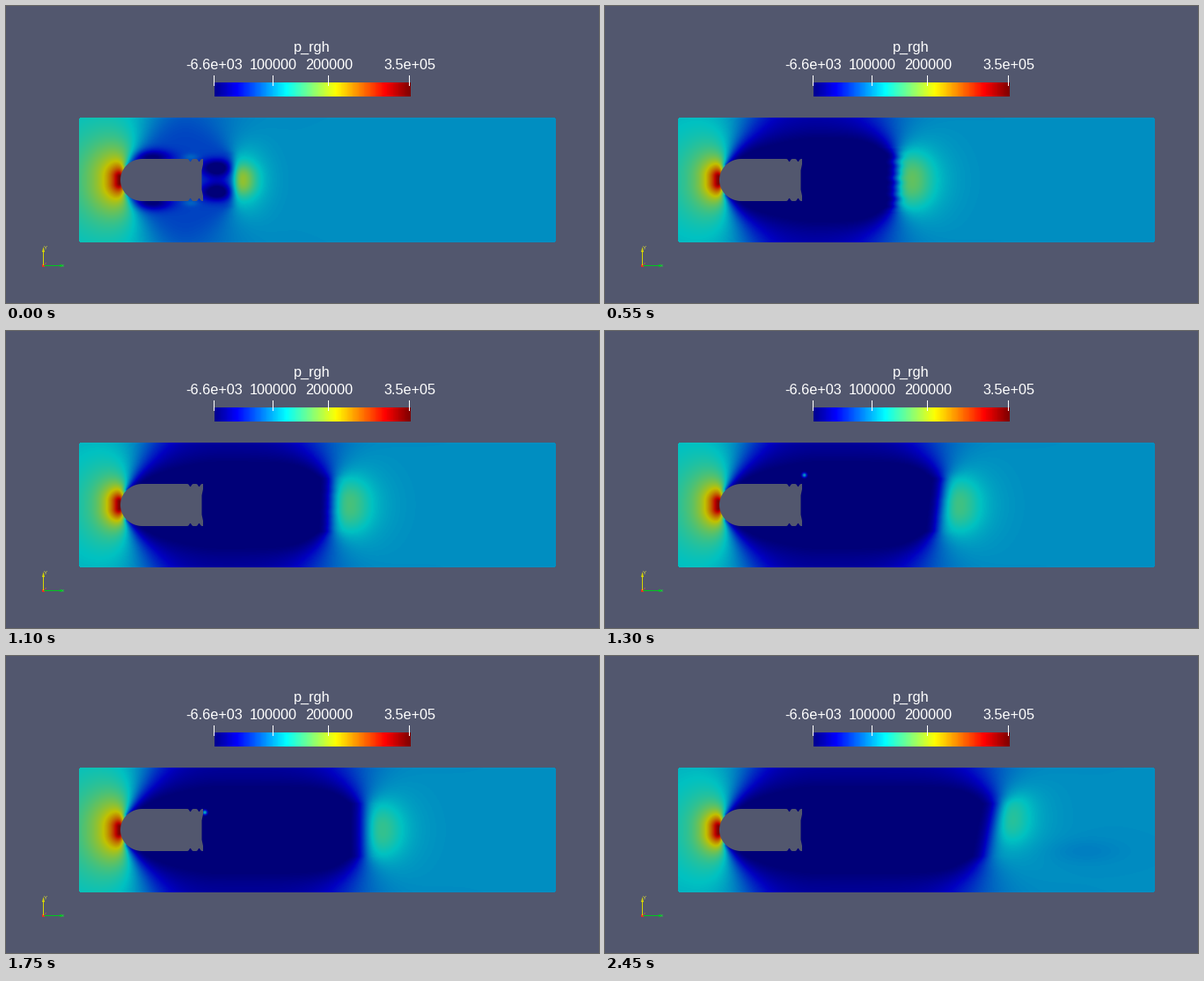
Animation, 674 px wide and 338 px high, one loop 2.5 s. Source, as a matplotlib script:

```python
import numpy as np
import matplotlib.pyplot as plt
from matplotlib.animation import FuncAnimation
from matplotlib.colors import LinearSegmentedColormap
from matplotlib.patches import Polygon

W, H, DPI = 674, 338, 64
FRAMES, STEP = 50, 50
PX = 72 / DPI
BG = (0.32, 0.34, 0.43)
LEFT, RIGHT, TOP, BOTTOM = 83, 625, 127, 269
MID = 198
AMBIENT = 0.297
FLOOR = 0.018
SHADE = 0.76

JET = LinearSegmentedColormap.from_list("flow", [
    (0, (0, 0, 0.5625)), (0.111, (0, 0, 1)), (0.365, (0, 1, 1)),
    (0.619, (1, 1, 0)), (0.873, (1, 0, 0)), (1, (0.5, 0, 0))], N=256)

X, Y = np.meshgrid(np.arange(LEFT, RIGHT) + 0.5, np.arange(TOP, BOTTOM) + 0.5)
DY = Y - MID
AY = np.abs(DY)


def sigmoid(v):
    return 1 / (1 + np.exp(-np.clip(v, -40, 40)))


def smooth(v):
    v = np.clip(v, 0, 1)
    return v * v * (3 - 2 * v)


def blob(x, y, rx, ry):
    return np.exp(-((X - x) / rx) ** 2 - ((Y - y) / ry) ** 2)


def mirrored(x, off, rx, ry):
    return blob(x, MID - off, rx, ry) + blob(x, MID + off, rx, ry)


# High pressure at the nose, fading downstream
R = np.hypot(X - 130, np.maximum(AY - 4, 0))
NOSE = 0.75 / (1 + (R / 13) ** 1.3) * (1 - smooth((X - 130) / 150))
NOSE_FAR = smooth(R / 40)

# Low pressure envelope around the body and the cavity
SIDE = np.maximum(AY - 18, 0)
ENTRY = sigmoid((X - 136 - 0.55 * SIDE) / (2.5 + 0.28 * SIDE))
OUTER = np.maximum(AY - 30, 0)
CORE = 24 + 12 * smooth((X - 150) / 90)
SPREAD = 1 - np.exp(-(np.maximum(AY - CORE, 0) / 22) ** 2)
START = (0.2 - 0.2 * mirrored(166, 25, 22, 9) - 0.24 * mirrored(240, 14, 19, 9.5)
         - 0.05 * blob(240, MID, 14, 12) + 0.05 * mirrored(210, 26, 9, 4))


def vortices(u):
    """Small eddies shed from the tail, alternating in height."""
    total = 0
    for k in range(4):
        age = u - (0.34 + 0.47 * k)
        total = total + 0.34 * np.exp(-(age / 0.07) ** 2) * blob(
            226 + 30 * age, 164 + 14 * (k % 2), 2.8, 2.8)
    jet = 0.45 * np.exp(-((u - 0.3) / 0.08) ** 2)
    return total + jet * blob(223, MID + 2, 6, 9)


def pressure(u):
    """Pressure at u seconds, scaled to 0..1."""
    front = 258 + 104.6 * u ** 0.612
    swing = 0.05 + 0.25 * np.cos(2 * np.pi * u / 1.75)
    tilt = 0.1 * u * max(0, np.sin(2 * np.pi * (u - 1.05) / 1.2))
    rough = 10 * u * np.exp(-u / 0.25)
    far = 0.06 + 0.14 * np.exp(-u / 0.25)
    late = smooth((u - 1.8) / 0.7)

    # Closure zone just behind the cavity
    amp = 0.12 + 0.15 * np.exp(-u / 0.9)
    bw = 11 + 6 * smooth(u / 0.4)
    bh = 14 + 9 * smooth(u / 0.3)
    dx = X - (front + 10 + 11 * smooth((u - 0.25) / 0.5))
    dy = DY + 14 * late
    core = np.exp(-(dx / (bw * np.where(dx > 0, 1.35, 1))) ** 2
                  - np.abs(dy / (bh * 1.25)) ** 2.4)
    halo = np.exp(-(dx / (bw * 2.7)) ** 2 - (dy / (bh + 22)) ** 2)
    base = AMBIENT + NOSE * (1 + swing * NOSE_FAR) + amp * (0.65 * core + 0.35 * halo)
    base -= 0.02 * late * blob(545, 222, 42, 14)

    ripple = np.sin(Y / 1.5 + 11 * u) + np.sin(Y / 2.7 - 8 * u)
    edge = front - tilt * np.clip(DY, -40, 40) - 0.4 * OUTER + rough * ripple * (AY < 38)
    wake = ENTRY * sigmoid((edge - X) / (3.2 + u + 0.38 * OUTER))
    grown = smooth(u / 0.26)
    low = (1 - grown) * START + grown * far * SPREAD
    p = base * (1 - wake) + low * wake + vortices(u)
    return np.clip(p, FLOOR, 1)


def render(u):
    rgba = JET(pressure(u))
    rgba[..., :3] *= SHADE
    rgba[::BOTTOM - TOP - 1, ::RIGHT - LEFT - 1, 3] = 0  # soften corners
    return rgba


def body_outline():
    a = np.linspace(0, np.pi / 2, 24)
    tail = np.linspace(204, 224, 41)
    notch = sum(3.2 * np.exp(-((tail - x) / 1.6) ** 2) for x in (209.5, 219.5))
    xs = np.concatenate([155 - 25 * np.cos(a), tail, [224, 222.5]])
    half = np.concatenate([24 * np.sin(a), 24 - notch, [18, 11]])
    upper = list(zip(xs, MID - half))
    return upper + [(x, 2 * MID - y) for x, y in reversed(upper)]


fig = plt.figure(figsize=(W / DPI, H / DPI), dpi=DPI, facecolor=BG)
ax = fig.add_axes([0, 0, 1, 1])
ax.axis("off")


def line(xs, ys, color):
    ax.plot(xs, ys, color=color, lw=PX, solid_capstyle="butt", snap=False)


def label(x, y, text, size=16.2, color="white"):
    ax.text(x, y, text, color=color, fontsize=size * PX, ha="center",
            va="baseline", family="Liberation Sans")


flow = ax.imshow(render(0), extent=(LEFT, RIGHT, BOTTOM, TOP),
                 interpolation="nearest", zorder=1)
ax.add_patch(Polygon(body_outline(), fc=BG, ec="none", zorder=2))

# Colour legend
ax.imshow(np.linspace(0, 1, 223)[None, :], cmap=JET, extent=(236.5, 459.5, 103, 87),
          interpolation="nearest")
label(347.5, 52, "p_rgh")
for x, text in [(236.5, "-6.6e+03"), (303.5, "100000"),
                (366.5, "200000"), (458.5, "3.5e+05")]:
    line([x, x], [79, 91], "white")
    label(x + 0.5, 72, text)

# Orientation axes
line([42.5, 42.5], [295, 279], "#d8d800")
line([43, 62], [295.5, 295.5], "#00c81e")
for pts, color in [([(41, 280), (44, 280), (42.5, 274)], "#d8d800"),
                   ([(61, 294), (61, 297), (66, 295.5)], "#00c81e"),
                   ([(41, 294), (43.5, 294), (43.5, 296.5), (41, 296.5)], "#e83020")]:
    ax.add_patch(Polygon(pts, fc=color, ec="none"))
label(44.5, 277, "Y", 6, "#e0e040")
label(64.5, 297, "x", 6, "#20e040")
label(44.5, 294, "z", 4, "#e06040")

ax.set_xlim(0, W)
ax.set_ylim(H, 0)
ax.set_aspect("auto")


def update(i):
    flow.set_data(render(i * STEP / 1000))
    return [flow]


anim = FuncAnimation(fig, update, frames=FRAMES, interval=STEP, repeat=True,
                     repeat_delay=0, blit=False)
plt.show()
```
